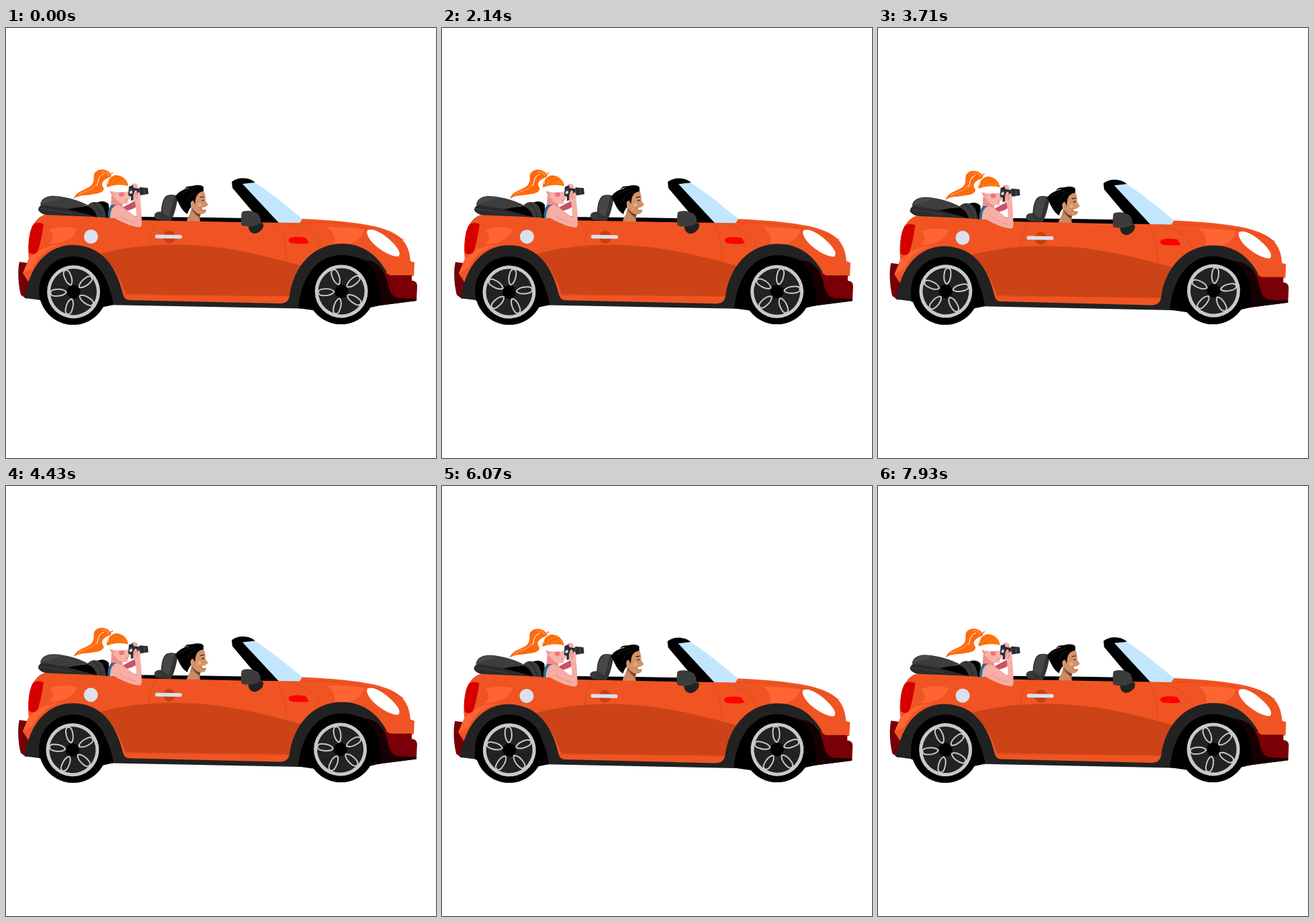
Recreate the animation shown at these times as an HTML page with a canvas. Size 640 px wide and 640 px high, loop 8 s.

```html
<!DOCTYPE html>
<html lang="en">
<head>
<meta charset="utf-8">
<title>Convertible ride</title>
<style>
html, body { margin: 0; width: 100%; height: 100%; overflow: hidden; background: #fff; }
canvas { display: block; width: 100vmin; height: 100vmin; margin: 0 auto; }
</style>
</head>
<body>
<canvas id="stage"></canvas>
<script>
const SIZE = 640, LOOP = 8000, STEPS = 112, BOB = 33.2;
const canvas = document.getElementById('stage');
const ctx = canvas.getContext('2d');

const fillShape = (color, d) => ({ color, path: new Path2D(d) });
const lineShape = (color, width, d) => ({ color, width, path: new Path2D(d) });

const cabin = [
  fillShape('#000', 'M60 277L150 274L200 281L300 282L355 283L400 285L412 293L60 286Z'),
  // folded roof
  fillShape('#2b2b2b', 'M48 270C49 265 53 262 58 261L98 267L124 265L146 281L100 281L58 278C53 276 49 274 48 270Z'),
  fillShape('#3d3d3d', 'M51 263C52 254 61 249 73 250C91 251 109 257 123 264L94 269C77 267 63 264 51 263Z'),
  fillShape('#494949', 'M53 259C60 250 72 250 83 252C75 257 64 258 53 262Z'),
  lineShape('#444', 1, 'M50 269C66 270 82 274 98 276'),
  fillShape('#000', 'M92 270C104 267 116 266 123 264L149 283L134 281C120 277 106 273 92 270Z'),
  // rear seat
  fillShape('#000', 'M134 261C140 256 150 258 153 263L154 284L140 283Z'),
  fillShape('#3a3a3a', 'M121 265C125 258 135 257 141 262C147 267 148 276 149 283L136 282C133 273 129 268 121 265Z'),
  lineShape('#222', 1, 'M129 260C137 265 141 274 142 283')
];

const passenger = [
  fillShape('#ff6a0e', 'M157 221C155 211 142 208 135 213C127 218 134 226 128 233C122 241 105 241 101 254C111 247 121 250 131 247C144 246 148 240 144 236C140 229 148 224 157 221Z'),
  lineShape('#fff', 1, 'M135 235C138 228 136 221 146 217'),
  lineShape('#ffa052', 1.2, 'M108 248C121 240 130 242 134 232M142 214C149 213 152 216 153 220'),
  lineShape('#ff6a0e', 1.5, 'M154 219L159 215'),
  fillShape('#c95268', 'M172 268C179 264 187 260 192 257L194 266C188 270 181 272 175 273Z'),
  fillShape('#ee8f8c', 'M157 248L173 256L174 269L156 268Z'),
  fillShape('#f7b3a8', 'M154 242L183 240L185 254L181 256L182 261C175 263 168 261 164 255L157 248Z'),
  fillShape('#ee7380', 'M168 248A4 3.5 0 1 1 176 247A4 3.5 0 1 1 168 248Z'),
  lineShape('#cc555d', .8, 'M178 256L182 256M157 244C158 248 160 249 161 246'),
  fillShape('#f6ada4', 'M152 283C151 270 156 262 167 264C177 267 185 276 194 281C194 272 193 263 191 254L199 249C201 263 202 276 202 291C202 297 199 297 194 296C179 293 168 286 161 283Z'),
  lineShape('#e98f8a', 1, 'M169 279C177 284 186 289 194 290'),
  fillShape('#176f93', 'M152 283C151 274 153 267 157 263L165 263C157 266 155 274 155 283Z'),
  lineShape('#c84658', .8, 'M154 275C155 269 158 265 162 264'),
  fillShape('#ff750f', 'M150 237C149 226 156 219 165 219C175 220 181 227 182 235L166 238Z'),
  lineShape('#df5306', .8, 'M153 235C154 227 159 222 168 221M160 234C161 229 165 225 173 225'),
  lineShape('#fff', 1, 'M152 232C151 226 154 222 159 220'),
  fillShape('#fff', 'M147 239C158 233 173 232 183 236L183 243C171 246 156 244 147 239Z'),
  fillShape('#f6ada4', 'M187 236C185 232 191 230 195 233L197 238L190 240Z'),
  fillShape('#292c33', 'M183 236L189 234L190 238L198 239L199 237L211 238L212 247L200 249L190 249L190 256L186 257L186 251L182 249Z'),
  lineShape('#555b63', 1, 'M199 240L199 247M206 239L206 247M184 241L188 241'),
  fillShape('#d8e0e5', 'M184 243L188 242L188 246L184 247Z'),
  fillShape('#f7b3a8', 'M190 258C189 252 189 247 192 242C195 241 196 244 194 248L197 244C201 246 201 253 198 260Z'),
  lineShape('#cf6972', .8, 'M193 245L191 253M196 248L194 255')
];

const driver = [
  fillShape('#3a3a3a', 'M222 276C226 272 234 273 240 276L246 287L224 285C221 282 220 279 222 276Z'),
  fillShape('#333', 'M231 281C230 267 233 252 240 249C246 247 253 248 256 251C254 264 251 277 246 286L235 286Z'),
  fillShape('#464646', 'M233 275C232 263 236 253 242 250C247 248 250 248 251 250C247 261 247 271 242 281Z'),
  fillShape('#b97855', 'M276 266L288 275L289 288L269 289C270 282 276 277 276 266Z'),
  fillShape('#c98a64', 'M269 288C270 281 275 275 281 273L289 288Z'),
  fillShape('#7a442e', 'M277 269C281 274 285 277 290 277L288 282C283 279 279 275 277 269Z'),
  fillShape('#d39269', 'M276 251L286 241L294 242C297 247 297 253 297 257L301 263L297 266L298 272C297 278 289 278 284 275C279 271 275 265 276 251Z'),
  fillShape('#000', 'M252 251C256 244 264 240 270 239C278 233 291 232 294 237L294 243C287 244 283 248 282 256L281 264L279 257C275 256 274 262 276 266C272 270 271 274 270 277C260 271 258 261 252 251Z'),
  lineShape('#000', 1.2, 'M268 237C276 235 283 235 290 239M266 239C272 236 278 236 283 238'),
  lineShape('#303030', .7, 'M260 249C266 243 273 241 280 240M270 257C272 251 276 246 283 243'),
  fillShape('#d39269', 'M275 263C274 258 279 257 281 261L281 267C278 268 276 266 275 263Z'),
  lineShape('#2d1612', 1.2, 'M289 252L295 251M291 257L295 256'),
  fillShape('#fff', 'M291 268L298 266L297 270C294 272 292 270 291 268Z'),
  lineShape('#974938', .8, 'M289 267C291 271 294 273 297 271'),
  fillShape('#e3aa7e', 'M285 263A3 3 0 1 1 291 263A3 3 0 1 1 285 263Z')
];

const body = [
  // windscreen
  fillShape('#000', 'M336 229C344 222 361 221 371 230L357 234L411 291L381 290L337 238Z'),
  fillShape('#c3e6ff', 'M352 232L370 230C396 246 424 270 441 284L437 291L407 291Z'),
  // rear and front bumpers
  fillShape('#760008', 'M20 348L34 350L44 390L30 403L22 397C18 382 17 360 20 348Z'),
  fillShape('#f05423', 'M57 278L130 281L200 286L350 289L437 290L441 284C485 286 520 289 548 295C586 304 600 318 602 347L608 349L607 369L570 372L559 388L437 411L177 406L100 389L40 388L25 365L34 343C31 318 35 286 57 278Z'),
  fillShape('#cb4317', 'M140 336C202 319 273 320 325 328C367 334 407 345 440 354L423 399L178 396C169 370 158 350 140 336Z'),
  fillShape('#ff6533', 'M64 301C78 295 96 296 105 299C103 312 85 322 64 321C74 314 71 306 64 301ZM477 296C496 297 515 297 533 300C530 316 511 324 487 327C493 314 488 303 477 296Z'),
  fillShape('#ff6533', 'M34 344C45 331 62 323 81 323C60 327 47 340 40 357L25 365Z'),
  lineShape('#d5481a', .8, 'M226 287C215 299 213 312 213 326M403 291C416 309 417 331 417 348M420 291C449 297 462 310 468 325M440 290C499 287 551 298 592 315M177 397L420 399'),
  // lamps and fittings
  fillShape('#d50000', 'M41 292C47 289 53 290 56 292C54 306 51 322 47 333C43 338 36 337 34 333C33 319 35 299 41 292Z'),
  fillShape('#fff', 'M538 301C547 297 562 306 575 319C585 329 588 336 584 340C574 341 555 330 545 319C538 311 536 304 538 301Z'),
  fillShape('#dce0ed', 'M116 310.5A10.5 10.5 0 1 1 137 310.5A10.5 10.5 0 1 1 116 310.5Z'),
  fillShape('#c44014', 'M234 311A9 9.5 0 1 1 252 311A9 9.5 0 1 1 234 311Z'),
  fillShape('#dce0ed', 'M224 307.5L260 308Q262 308 262 311Q262 313.5 260 313.5L224 313Q222 313 222 310.5Q222 307.5 224 307.5Z'),
  fillShape('#f00', 'M422 313C427 310 440 311 446 312L451 320C444 322 430 321 424 320C420 318 420 315 422 313Z'),
  // cladding, wheel wells and front bumper
  fillShape('#222', 'M28 402C35 352 63 323 100 323C145 324 165 358 174 396Q176 405 184 405L408 410Q420 410 422 399C428 353 459 321 500 321C532 321 553 339 566 362L570 405L556 412L437 417.5L145 412L52 405Z'),
  fillShape('#000', 'M50 405C47 364 69 340 101 340C134 341 154 373 160 412L100 425Z'),
  fillShape('#000', 'M435 417C440 370 462 338 500 338C517 338 530 344 541 349C554 363 560 391 556 413L500 426Z'),
  fillShape('#790007', 'M530 345C547 345 559 362 572 368L604 368L604 376C609 376 612 379 612 384L611 406L556 413C554 382 547 360 530 345Z'),
  fillShape('#170002', 'M528 345C552 344 563 359 568 379C571 394 575 402 589 402L611 403L611 406L556 413C554 382 547 360 528 345Z'),
  fillShape('#000', 'M528 345C546 349 559 378 557 413L538 415Z'),
  // mirror
  fillShape('#222', 'M361 292L382 290C386 297 378 305 370 306C363 305 360 300 361 292Z'),
  fillShape('#3c3c3c', 'M351 274C356 271 367 271 376 277L379 284L379 290C371 296 360 296 351 294C349 288 350 279 351 274Z')
];

// the passenger's elbow rests outside the door
const carShapes = [...cabin, ...driver, ...body, ...passenger];
const spoke = new Path2D('M10.5 0C14 -4.5 21 -5.5 28 -4.8C36.5 -3.8 36.5 3.8 28 4.8C21 5.5 14 4.5 10.5 0Z');

function drawShape({ color, width, path }) {
  if (width) {
    ctx.strokeStyle = color;
    ctx.lineWidth = width;
    ctx.stroke(path);
  } else {
    ctx.fillStyle = color;
    ctx.fill(path);
  }
}

function disc(x, y, r, color) {
  ctx.fillStyle = color;
  ctx.beginPath();
  ctx.arc(x, y, r, 0, 2 * Math.PI);
  ctx.fill();
}

function drawWheel(x, y, angle) {
  disc(x, y, 50.8, '#000');
  ctx.save();
  // the rim sits slightly off the axle
  ctx.translate(x - .3 + 1.2 * Math.cos(angle + .2), y + .8 + 1.2 * Math.sin(angle + .2));
  ctx.rotate(angle);
  disc(0, 0, 39.5, '#c9c9c9');
  disc(0, 0, 34.5, '#222');
  ctx.strokeStyle = '#c9c9c9';
  ctx.lineWidth = 2;
  for (let i = 0; i < 5; i++) {
    ctx.stroke(spoke);
    ctx.rotate(2 * Math.PI / 5);
  }
  disc(0, 0, 10, '#000');
  ctx.restore();
}

function drawCar(bob) {
  ctx.save();
  ctx.translate(100, 1.9 * bob);
  ctx.rotate(.002 * bob);
  ctx.translate(-100, 0);
  carShapes.forEach(drawShape);
  ctx.restore();
}

function render(time) {
  const step = Math.floor((time + 5) / LOOP * STEPS) % STEPS;
  const bob = (1 - Math.cos(2 * Math.PI * step / BOB)) / 2;
  const drift = 4 * Math.sin(2 * Math.PI * step / STEPS);
  const angle = (33 + 12.96 * step + drift) * Math.PI / 180;
  const scale = canvas.width / SIZE;
  ctx.setTransform(scale, 0, 0, scale, 0, 0);
  ctx.fillStyle = '#fff';
  ctx.fillRect(0, 0, SIZE, SIZE);
  drawCar(bob);
  drawWheel(100, 391, angle);
  drawWheel(498.6, 390.3, angle);
}

function fit() {
  const side = Math.min(innerWidth, innerHeight) || SIZE;
  canvas.width = canvas.height = Math.round(side * (devicePixelRatio || 1));
}

const start = performance.now();
function tick() {
  render(performance.now() - start);
  requestAnimationFrame(tick);
}
addEventListener('resize', fit);
fit();
tick();
</script>
</body>
</html>
```
